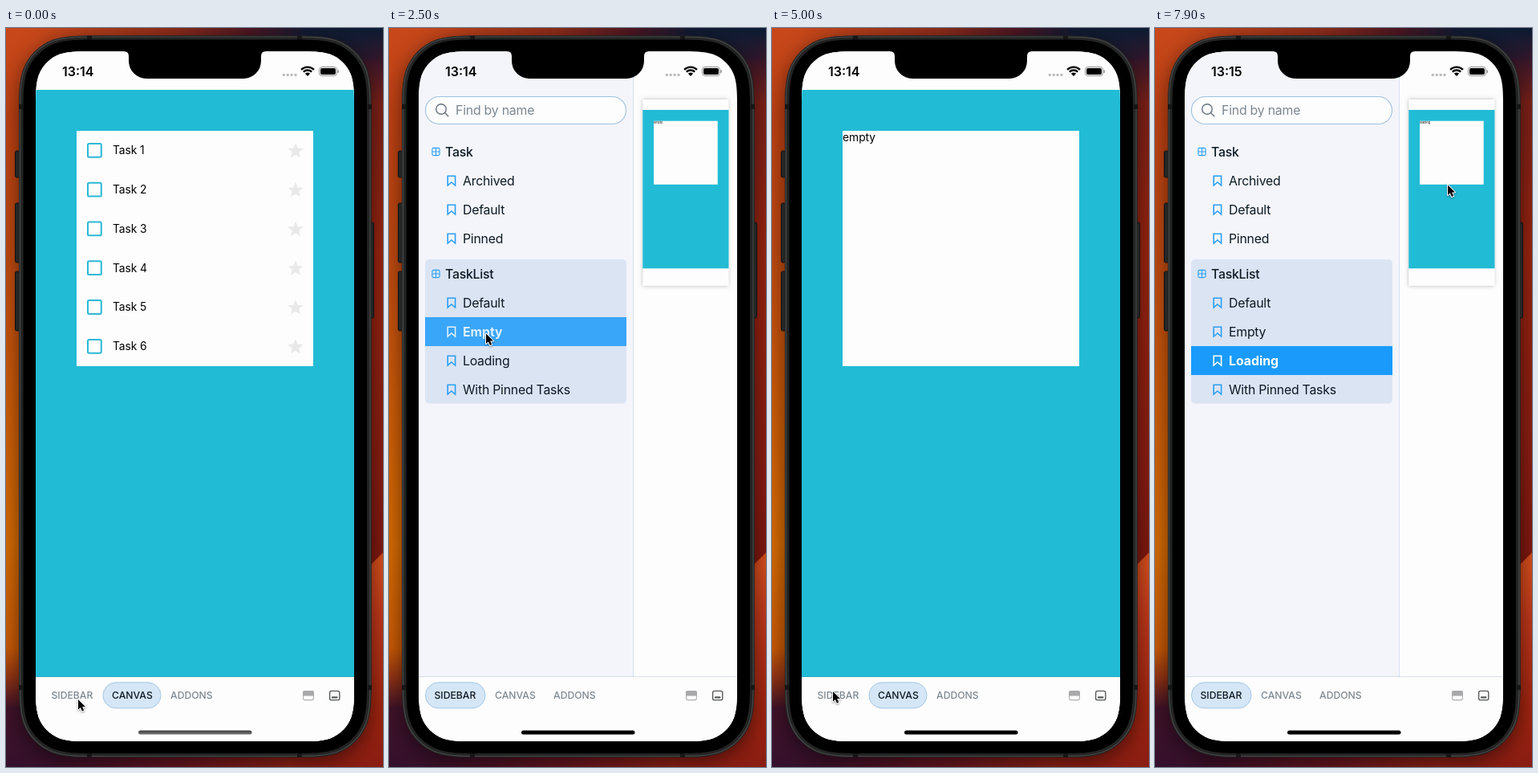
These frames come from a looping animation (470x920 px, 8 s). An HTML page with a canvas:

```html
<!DOCTYPE html>
<html lang="en">
<head>
<meta charset="utf-8">
<title>Phone sidebar demo</title>
<style>
  html, body { margin: 0; width: 100%; height: 100%; overflow: hidden; background: #000; }
  canvas { display: block; width: 470px; height: 920px; }
</style>
</head>
<body>
<canvas id="stage"></canvas>
<script>
const W = 470, H = 920, LOOP = 8000;
const stage = document.getElementById('stage');
const dpr = window.devicePixelRatio || 1;
stage.width = W * dpr;
stage.height = H * dpr;
const ctx = stage.getContext('2d');

const WHITE = '#fdfdfd', TEAL = '#22bbd5', BLUE = '#1a9bfc', INK = '#0c1a24';
const SCREEN = { x: 37, y: 29, w: 397, h: 859 };
const MINI = { x: 316.3, y: 89, scale: .27 };
const PANEL = 267.5, TRAVEL = 269.5;

// ---------- timing ----------
const clamp = v => Math.max(0, Math.min(1, v));
const mix = (a, b, k) => a + (b - a) * k;
const easeIn = x => Math.pow(x, 1.65);
const easeOut = x => 1 - easeIn(1 - x);
const easeInOut = x => x < .5 ? easeIn(2 * x) / 2 : 1 - easeIn(2 - 2 * x) / 2;
const ramp = (t, start, span) => easeInOut(clamp((t - start) / span));

const OPEN = 944, CLOSE = 3250, REOPEN = 5504, SLIDE = 400;
const PICK_EMPTY = 2325, PICK_LOADING = 6680;

const openness = t =>
  ramp(t, OPEN, SLIDE) - ramp(t, CLOSE, SLIDE) + ramp(t, REOPEN, SLIDE);
const sidebarOn = t => (t >= OPEN && t < CLOSE) || t >= REOPEN;
const selected = t => t < PICK_EMPTY ? 'Default' : t < PICK_LOADING ? 'Empty' : 'Loading';
const pressAlpha = (t, at) => t < at ? 1 - .8 * clamp((t - at + 100) / 100) : .2 + .8 * ramp(t, at, 250);

// time, x, y, easing of the move that ends here
const PATH = [
  [0, 90, 836], [100, 90, 836], [200, 91, 833.5], [1350, 91, 833.5],
  [2050, 121, 380.5], [2550, 121, 380.5], [3050, 366, 198], [3550, 366, 198],
  [4000, 333, 319.5, easeIn], [4900, 76, 826, easeOut], [5650, 76, 826],
  [6250, 143.5, 421.5], [6900, 143.5, 421.5], [7600, 365, 195.5], [LOOP, 365, 195.5]
];

function cursorAt(t) {
  const i = PATH.findIndex(p => p[0] > t);
  const [t0, x0, y0] = PATH[i - 1];
  const [t1, x1, y1, ease = easeInOut] = PATH[i];
  const k = ease((t - t0) / (t1 - t0));
  return [mix(x0, x1, k), mix(y0, y1, k)];
}

// ---------- drawing helpers ----------
function paint(fill, stroke, line = 1) {
  if (fill) { ctx.fillStyle = fill; ctx.fill(); }
  if (stroke) { ctx.strokeStyle = stroke; ctx.lineWidth = line; ctx.stroke(); }
}

function box(x, y, w, h, r, fill, stroke, line) {
  ctx.beginPath();
  ctx.roundRect(x, y, w, h, r);
  paint(fill, stroke, line);
}

// rectangle whose corners bend gradually into the sides
function smoothRect(x, y, w, h, r) {
  const corner = (cx, cy, ux, uy, vx, vy) => {
    const at = (a, b) => [cx + r * (a * ux + b * vx), cy + r * (a * uy + b * vy)];
    ctx.lineTo(...at(1.529, 0));
    ctx.bezierCurveTo(...at(1.089, 0), ...at(.868, 0), ...at(.631, .075));
    ctx.bezierCurveTo(...at(.373, .169), ...at(.169, .373), ...at(.075, .631));
    ctx.bezierCurveTo(...at(0, .868), ...at(0, 1.089), ...at(0, 1.529));
  };
  ctx.beginPath();
  corner(x, y, 1, 0, 0, 1);
  corner(x, y + h, 0, -1, 1, 0);
  corner(x + w, y + h, -1, 0, 0, -1);
  corner(x + w, y, 0, 1, -1, 0);
  ctx.closePath();
}

function poly(points, close) {
  ctx.beginPath();
  points.forEach(([x, y]) => ctx.lineTo(x, y));
  if (close) ctx.closePath();
}

// y is the middle of the capitals
function label(str, x, y, size, color, weight = 400, spacing = 0) {
  ctx.font = `${weight} ${size}px Inter, "Liberation Sans", sans-serif`;
  ctx.letterSpacing = spacing + 'px';
  ctx.fillStyle = color;
  ctx.fillText(str, x, y + size * .364);
}

function shade(x0, y0, x1, y1, stops) {
  const g = ctx.createLinearGradient(x0, y0, x1, y1);
  stops.forEach(([at, color]) => g.addColorStop(at, color));
  return g;
}

// ---------- wallpaper and phone body ----------
function drawWallpaper() {
  ctx.fillStyle = shade(0, 0, 0, H, [
    [0, '#c8481a'], [.12, '#bd4013'], [.3, '#bb4710'], [.5, '#ca5a08'], [.7, '#d46a04'],
    [.84, '#c65806'], [.88, '#8f3214'], [.92, '#401228'], [1, '#35102c']]);
  ctx.fillRect(0, 0, W / 2, H);
  ctx.fillStyle = shade(0, 0, 0, H, [
    [0, '#0c1c33'], [.04, '#33162a'], [.1, '#7a2018'], [.3, '#96230f'], [.6, '#861c12'],
    [.726, '#7c170f'], [.726, '#d24c1c'], [.8, '#bd361a'], [.92, '#9e2410'], [1, '#8a1c12']]);
  ctx.fillRect(W / 2, 0, W / 2, H);
  ctx.fillStyle = shade(0, 0, W, 0, [
    [0, 'rgba(200,72,26,0)'], [.15, '#bf431a'], [.45, '#8c2b1a'], [.65, '#4a1622'],
    [.8, '#121a33'], [1, 'rgba(12,28,51,0)']]);
  ctx.fillRect(0, 0, W, 40);
  ctx.fillStyle = shade(0, 0, W, 0, [
    [0, 'rgba(53,16,44,0)'], [.15, '#3c1028'], [.45, '#641420'], [.75, '#8c2014'], [1, 'rgba(138,28,18,0)']]);
  ctx.fillRect(0, 880, W, 40);
  poly([[455, 668], [470, 653], [470, 668]], true);
  paint('#d24c1c');
}

function drawBody() {
  ctx.save();
  ctx.shadowColor = 'rgba(0,0,0,.5)';
  ctx.shadowBlur = 24 * dpr;
  ctx.shadowOffsetY = 6 * dpr;
  smoothRect(16, 9.5, 439.5, 898.5, 68);
  paint('#232424');
  ctx.restore();
  [[153, 33], [218, 74], [303, 74]].forEach(([y, h]) => box(11.5, y, 5.5, h, 2, '#252626', '#111', 1));
  box(454, 242, 4.5, 119, 2, '#252626', '#111', 1);
  smoothRect(16, 9.5, 439.5, 898.5, 68);
  paint('#232424');
  smoothRect(17.5, 11, 436.5, 895.5, 66.5);
  paint(null, '#474848', 1.2);
  ctx.fillStyle = '#161616';
  [[101, 10], [363, 10], [101, 903], [363, 903]].forEach(([x, y]) => ctx.fillRect(x, y, 6, 5));
  [[16, 95], [451, 95], [16, 818], [451, 818]].forEach(([x, y]) => ctx.fillRect(x, y, 5, 6));
  smoothRect(21.5, 14.5, 428.5, 888.5, 63);
  paint('#000');
}

function drawNotch() {
  ctx.beginPath();
  ctx.moveTo(146, 28);
  ctx.lineTo(147, 29);
  ctx.quadraticCurveTo(153, 29, 153, 35);
  ctx.lineTo(153, 41);
  ctx.arcTo(153, 63, 175, 63, 22);
  ctx.lineTo(296, 63);
  ctx.arcTo(318, 63, 318, 41, 22);
  ctx.lineTo(318, 35);
  ctx.quadraticCurveTo(318, 29, 324, 29);
  ctx.lineTo(325, 28);
  ctx.closePath();
  paint('#000');
}

function drawStatus(t) {
  label(t < 5900 ? '13:14' : '13:15', 70, 54.3, 16, '#000', 600);
  for (let i = 0; i < 4; i++) box(344.6 + 4.9 * i, 56.7, 3.4, 3.4, 1.7, '#b9b9bb');
  const a = -Math.PI * .75, b = -Math.PI * .25;
  [7.3, 11.2].forEach(r => {
    ctx.beginPath();
    ctx.arc(376, 59.8, r, a, b);
    paint(null, '#000', 2.3);
  });
  ctx.beginPath();
  ctx.moveTo(376, 60);
  ctx.arc(376, 59.8, 4.4, a, b);
  paint('#000');
  box(390.5, 48.5, 22, 11, 3.4, null, '#8f8f8f', 1);
  box(392, 50, 19, 8, 2, '#000');
  box(413.6, 52.3, 1.4, 3.6, .7, '#8f8f8f');
}

// ---------- story preview ----------
function drawStar(cx, cy, r) {
  ctx.beginPath();
  for (let i = 0; i < 10; i++) {
    const a = i * Math.PI / 5 - Math.PI / 2, d = i % 2 ? r * .43 : r;
    ctx.lineTo(cx + d * Math.cos(a), cy + d * Math.sin(a));
  }
  ctx.closePath();
  paint('#e9e9ea');
}

function drawTasks() {
  for (let i = 0; i < 6; i++) {
    const y = 152.2 + 48.8 * i;
    box(102, y - 8.3, 16.8, 16.8, 1.6, null, '#2cb9d6', 2);
    label('Task ' + (i + 1), 133, y, 13.8, '#000', 400, -.08);
    drawStar(361, y + 1, 10.3);
  }
}

function drawPreview(story, p) {
  const s = mix(1, MINI.scale, p);
  ctx.save();
  ctx.translate(mix(SCREEN.x, MINI.x, p), mix(SCREEN.y, MINI.y, p));
  ctx.scale(s, s);
  ctx.translate(-SCREEN.x, -SCREEN.y);
  ctx.shadowColor = `rgba(0,0,0,${.28 * clamp(p * 3)})`;
  ctx.shadowBlur = 5 * dpr;
  ctx.fillStyle = WHITE;
  ctx.fillRect(SCREEN.x, SCREEN.y, SCREEN.w, SCREEN.h);
  ctx.shadowColor = 'transparent';
  ctx.fillStyle = TEAL;
  ctx.fillRect(SCREEN.x, 77, SCREEN.w, 731);
  ctx.fillStyle = WHITE;
  ctx.fillRect(88, 128, 295, 293);
  if (story === 'Default') drawTasks();
  else label(story.toLowerCase(), 88, 136, 13.8, '#000');
  ctx.restore();
}

// ---------- sidebar ----------
function groupIcon(y) {
  box(53.9, y - 4.6, 9.2, 9.2, 1.6, null, '#2b9ff5', 1.1);
  poly([[58.5, y - 4.6], [58.5, y + 4.6]]);
  ctx.stroke();
  poly([[53.9, y], [63.1, y]]);
  ctx.stroke();
}

function bookmark(y, color) {
  poly([[73.2, y - 5.8], [82.6, y - 5.8], [82.6, y + 6], [77.9, y + 2], [73.2, y + 6]], true);
  paint(null, color, 1.6);
}

function group(name, y) {
  groupIcon(y);
  label(name, 70, y, 15.8, INK, 500, -.25);
}

function story(name, y, active, alpha = 1) {
  ctx.globalAlpha = alpha;
  if (active) box(45, y - 18, 251, 36, 0, BLUE);
  bookmark(y, active ? '#fff' : '#2b9ff5');
  label(name, 92, y, 15.8, active ? '#fff' : INK, active ? 700 : 400, active ? 0 : -.22);
  ctx.globalAlpha = 1;
}

function drawSidebar(t, p) {
  ctx.save();
  ctx.translate(-TRAVEL * (1 - p), 0);
  ctx.fillStyle = '#f4f5fb';
  ctx.fillRect(37, 29, PANEL, 779);
  ctx.fillStyle = '#d5e1f0';
  ctx.fillRect(304, 29, 1, 779);

  box(45.5, 85.5, 250, 34, 17, WHITE, '#9fc0de', 1.1);
  ctx.beginPath();
  ctx.arc(65, 101, 6.3, 0, 7);
  paint(null, '#66737f', 1.4);
  poly([[69.6, 105.6], [74.2, 110.2]]);
  ctx.stroke();
  label('Find by name', 83, 102.3, 15.8, '#7c8791', 400, -.2);

  group('Task', 154);
  ['Archived', 'Default', 'Pinned'].forEach((n, i) => story(n, 190 + 36 * i));
  box(45, 288, 251, 179.5, 5, '#dbe4f3');
  group('TaskList', 306);
  const now = selected(t);
  const press = { Empty: PICK_EMPTY, Loading: PICK_LOADING };
  ['Default', 'Empty', 'Loading', 'With Pinned Tasks'].forEach((n, i) =>
    story(n, 342 + 36 * i, n === now, press[n] ? pressAlpha(t, press[n]) : 1));
  ctx.restore();
}

// ---------- bottom bar ----------
function drawBar(t) {
  const on = sidebarOn(t) ? 'SIDEBAR' : 'CANVAS';
  ctx.fillStyle = WHITE;
  ctx.fillRect(37, 808, 397, 80);
  ctx.fillStyle = 'rgba(50,80,130,.16)';
  ctx.fillRect(37, 807, 397, 1);
  [['SIDEBAR', 56.5, 75], ['CANVAS', 132, 72.5], ['ADDONS', 205, 75]].forEach(([name, x, w]) => {
    const active = name === on;
    if (active) box(x - 11, 814.8, w - .5, 32, 16, '#d5e6f6', '#a3c6e5', 1);
    label(name, x, 831, 12.2, active ? INK : '#7d8891', 500);
  });
  box(370.6, 825.6, 12.8, 11, 2, WHITE, '#b0b0b2', 1.1);
  box(370, 825, 14, 6.5, [2.4, 2.4, 0, 0], '#a9a9ab');
  box(403.6, 825.4, 12.2, 11.2, 2.2, null, '#57585a', 1.4);
  box(406, 832.2, 7.4, 2.2, .6, '#57585a');
  const fade = clamp((t - 50) / 150);
  const tone = base => `rgb(${[0, 1, 2].map(() => Math.round(base * (1 - fade))).join()})`;
  box(165, 874.6, 141.5, 5, 2.5, shade(0, 874, 0, 880, [[0, tone(50)], [1, tone(130)]]));
}

function drawCursor(t) {
  const [x, y] = cursorAt(t);
  ctx.save();
  ctx.translate(x, y);
  poly([[0, 0], [0, 12.6], [2.9, 9.9], [5, 14.6], [7.2, 13.6], [5.1, 9.1], [9, 9.1]], true);
  ctx.lineJoin = 'round';
  ctx.shadowColor = 'rgba(0,0,0,.4)';
  ctx.shadowBlur = 2.5 * dpr;
  ctx.shadowOffsetY = dpr;
  paint(null, '#fff', 2);
  ctx.shadowColor = 'transparent';
  paint('#000');
  ctx.restore();
}

function draw(t) {
  const p = openness(t);
  ctx.setTransform(dpr, 0, 0, dpr, 0, 0);
  drawWallpaper();
  drawBody();
  ctx.save();
  smoothRect(SCREEN.x, SCREEN.y, SCREEN.w, SCREEN.h, 48);
  ctx.clip();
  ctx.fillStyle = WHITE;
  ctx.fillRect(SCREEN.x, SCREEN.y, SCREEN.w, SCREEN.h);
  drawPreview(selected(t), p);
  if (p > 0) drawSidebar(t, p);
  drawBar(t);
  drawStatus(t);
  ctx.restore();
  drawNotch();
  drawCursor(t);
}

const began = performance.now();
function tick() {
  draw((performance.now() - began) % LOOP);
  requestAnimationFrame(tick);
}
tick();
</script>
</body>
</html>
```
